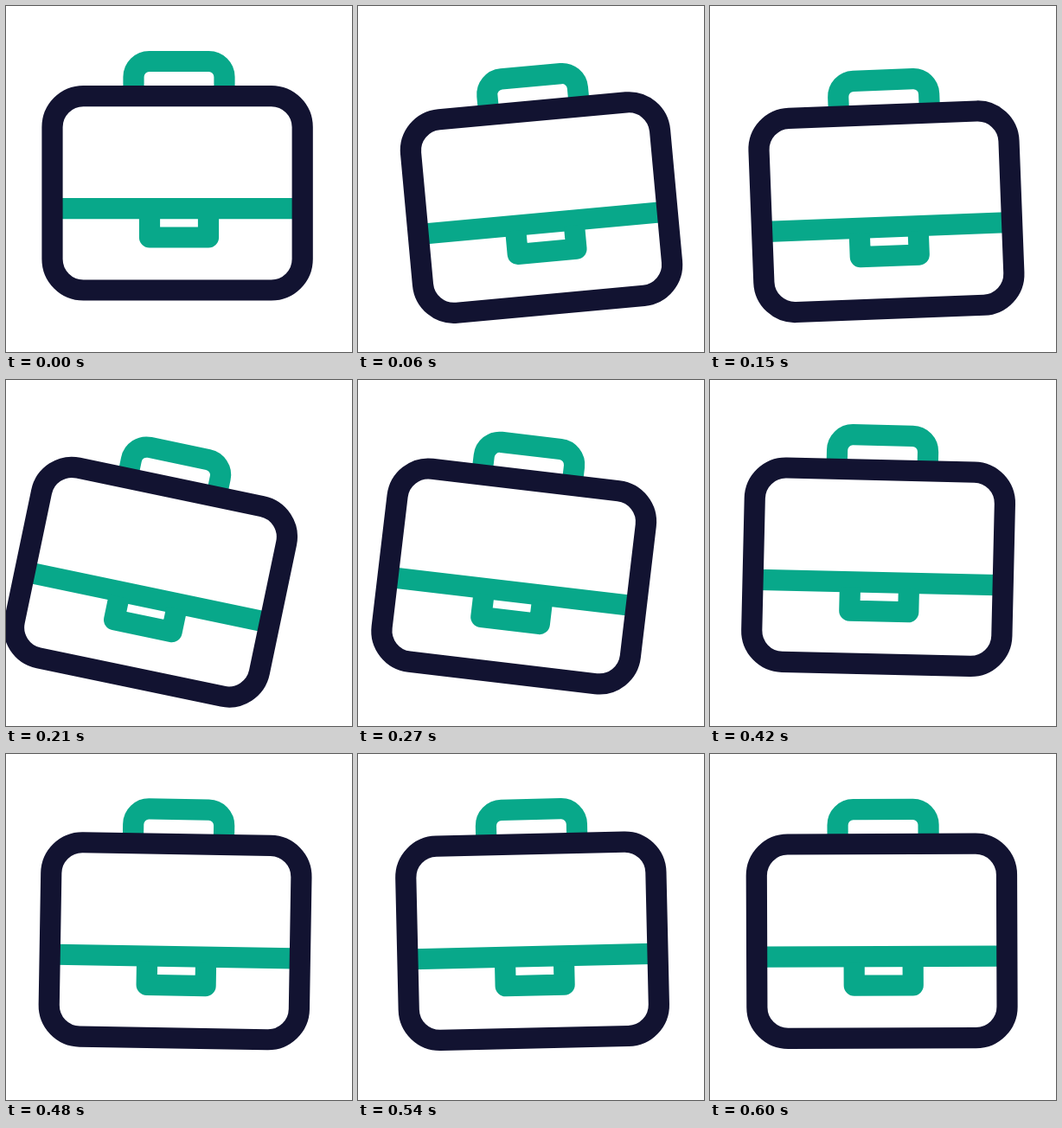
These frames come from a looping animation (400x400 px, 0.63 s). An HTML page:

```html
<!DOCTYPE html>
<html lang="en">
<head>
<meta charset="utf-8">
<title>Swinging briefcase</title>
<style>
  html, body { margin: 0; width: 100%; height: 100%; overflow: hidden; background: #fff; }
  svg { display: block; width: 100%; height: 100%; }
  path, rect { fill: none; stroke-width: 24.2; }
  .green { stroke: #08a88a; }
  .navy { stroke: #121331; }
</style>
</head>
<body>
<svg viewBox="0 0 400 400">
  <g id="bag">
    <path class="green" d="M147.5 100V82a18 18 0 0 1 18-18h69a18 18 0 0 1 18 18v18"/>
    <path class="green" d="M60 234.1H336"/>
    <path class="green" stroke-linejoin="round" d="M166 240v27.5h68V240"/>
    <rect class="navy" x="53.5" y="104.1" width="289.2" height="224.4" rx="36"/>
  </g>
</svg>
<script>
  const STEP = 30, COUNT = 21;
  const bag = document.getElementById('bag');

  // Smooth 0 to 1 over a span of steps
  function ease(t, from, to) {
    const x = Math.min(1, Math.max(0, (t - from) / (to - from)));
    return x * x * (3 - 2 * x);
  }

  // Wind up, swing through, then ring out as a damped wave
  function angle(t) {
    const back = 3.6, front = 7.3, rest = 11.4, halfWave = 3.52;
    if (t < rest) {
      return -9 * ease(t, 0, back) + 21.2 * ease(t, back, front) - 14.6 * ease(t, front, rest);
    }
    const s = t - rest;
    return -2.4 * Math.exp(-0.08 * s) * Math.cos(Math.PI * s / halfWave);
  }

  const drop = t => 21.5 * (ease(t, 0, 2.8) - ease(t, 6.5, 11.9));

  const start = performance.now();

  function draw() {
    const t = Math.floor((performance.now() - start) / STEP + 0.01) % COUNT;
    bag.setAttribute('transform', `translate(0 ${drop(t)}) rotate(${angle(t)} 200 64)`);
    requestAnimationFrame(draw);
  }
  draw();
</script>
</body>
</html>
```
